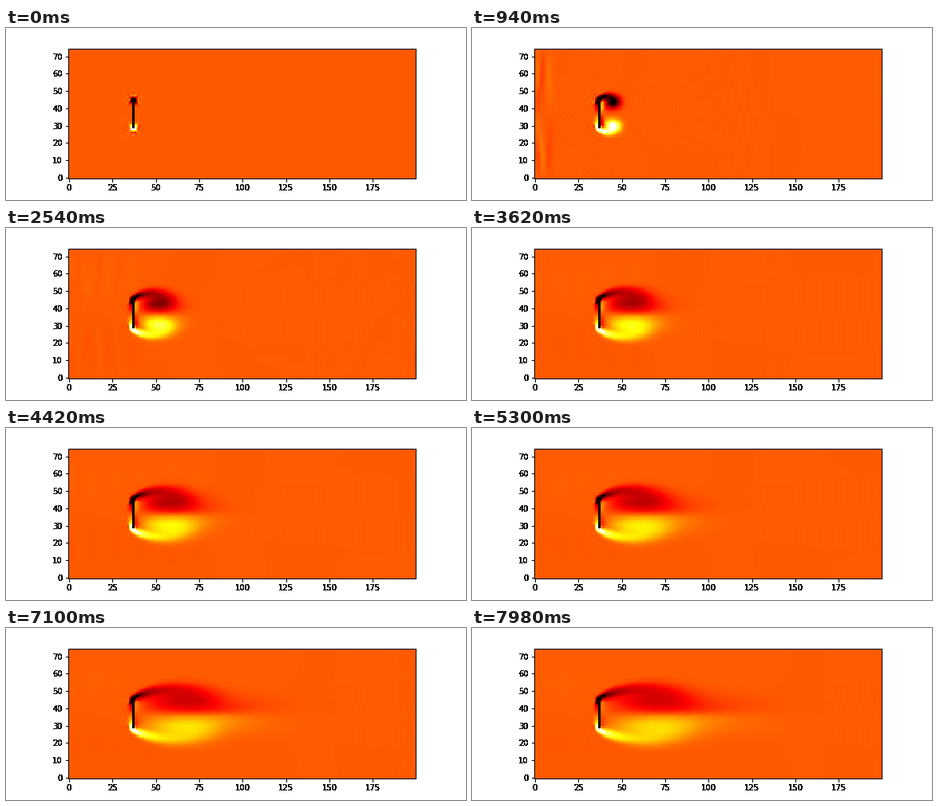
Write a matplotlib script that moves like this. It is 576 px wide and 216 px high and loops after 8 s.

```python
"""Lattice Boltzmann flow (D2Q9) past a flat plate, shown as vorticity."""
import numpy as np
import matplotlib.pyplot as plt
from matplotlib.animation import FuncAnimation
from matplotlib.colors import Normalize

HEIGHT, WIDTH = 75, 200
VISCOSITY = 0.02
OMEGA = 1 / (3 * VISCOSITY + 0.5)
U0 = 0.1
FRAMES, INTERVAL = 400, 20
STEPS = 3

# Directions as (x, y): rest, N, S, E, W, NE, NW, SE, SW
DIRS = [(0, 0), (0, 1), (0, -1), (1, 0), (-1, 0),
        (1, 1), (-1, 1), (1, -1), (-1, -1)]
OPPOSITE = [DIRS.index((-x, -y)) for x, y in DIRS]
WEIGHTS = [4 / 9] + [1 / 9] * 4 + [1 / 36] * 4

barrier = np.zeros((HEIGHT, WIDTH), bool)
mid = HEIGHT // 2
barrier[mid - 8:mid + 8, mid] = True


def shift(a, x, y):
    return np.roll(a, (y, x), axis=(0, 1))


def equilibrium(i, rho, ux, uy):
    x, y = DIRS[i]
    eu = x * ux + y * uy
    usq = ux * ux + uy * uy
    return WEIGHTS[i] * rho * (1 + 3 * eu + 4.5 * eu * eu - 1.5 * usq)


shifted = [shift(barrier, x, y) for x, y in DIRS]
inflow = [equilibrium(i, 1.0, U0, 0.0) for i in range(9)]


def stream(n):
    n = [shift(a, x, y) for a, (x, y) in zip(n, DIRS)]
    for i in range(1, 9):
        n[i][shifted[i]] = n[OPPOSITE[i]][barrier]
    return n


def collide(n):
    rho = sum(n)
    ux = sum(x * a for a, (x, y) in zip(n, DIRS) if x) / rho
    uy = sum(y * a for a, (x, y) in zip(n, DIRS) if y) / rho
    n = [(1 - OMEGA) * a + OMEGA * equilibrium(i, rho, ux, uy)
         for i, a in enumerate(n)]
    # Steady rightward flow at the left end
    for i in range(3, 9):
        n[i][:, 0] = inflow[i]
    return n, ux, uy


def curl(ux, uy):
    c = shift(uy, -1, 0) - shift(uy, 1, 0) - shift(ux, 0, -1) + shift(ux, 0, 1)
    return np.round(c, 9) + 0.0


def simulate():
    n = [np.full((HEIGHT, WIDTH), v) for v in inflow]
    fields = []
    for frame in range(FRAMES + 1):
        for _ in range(STEPS):
            n, ux, uy = collide(stream(n))
        fields.append(curl(ux, uy))
    return fields[1:]


fields = simulate()

plt.rcParams.update({"font.family": "DejaVu Sans", "font.size": 10})
fig = plt.figure(figsize=(8, 3), dpi=72, facecolor="white")
fig.subplots_adjust(left=0.125, right=0.9, bottom=0.125, top=0.88)
ax = fig.add_subplot()
fluid = ax.imshow(fields[0], origin="lower", norm=Normalize(-0.1, 0.1),
                  cmap="hot", interpolation="none")
plate = np.zeros((HEIGHT, WIDTH, 4), np.uint8)
plate[barrier, 3] = 255
wall = ax.imshow(plate, origin="lower", interpolation="none")
ax.set_xticks(range(0, WIDTH, 25))
ax.set_yticks(range(0, HEIGHT, 10))


def hard_edged_axes():
    """Render ticks, labels and frame once, as solid black without grey edges."""
    hidden = [fig.patch, ax.patch, fluid, wall]
    for artist in hidden:
        artist.set_visible(False)
    fig.canvas.draw()
    alpha = np.asarray(fig.canvas.buffer_rgba())[..., 3]
    for artist in hidden:
        artist.set_visible(True)
    ink = np.zeros(alpha.shape + (4,), np.uint8)
    ink[alpha > 24, 3] = 255
    return ink


fig.figimage(hard_edged_axes(), origin="upper", zorder=5)
ax.set_axis_off()


def update(frame):
    fluid.set_data(fields[frame])
    return fluid, wall


anim = FuncAnimation(fig, update, frames=FRAMES, interval=INTERVAL,
                     init_func=lambda: update(0), repeat=True, blit=False)
plt.show()
```
